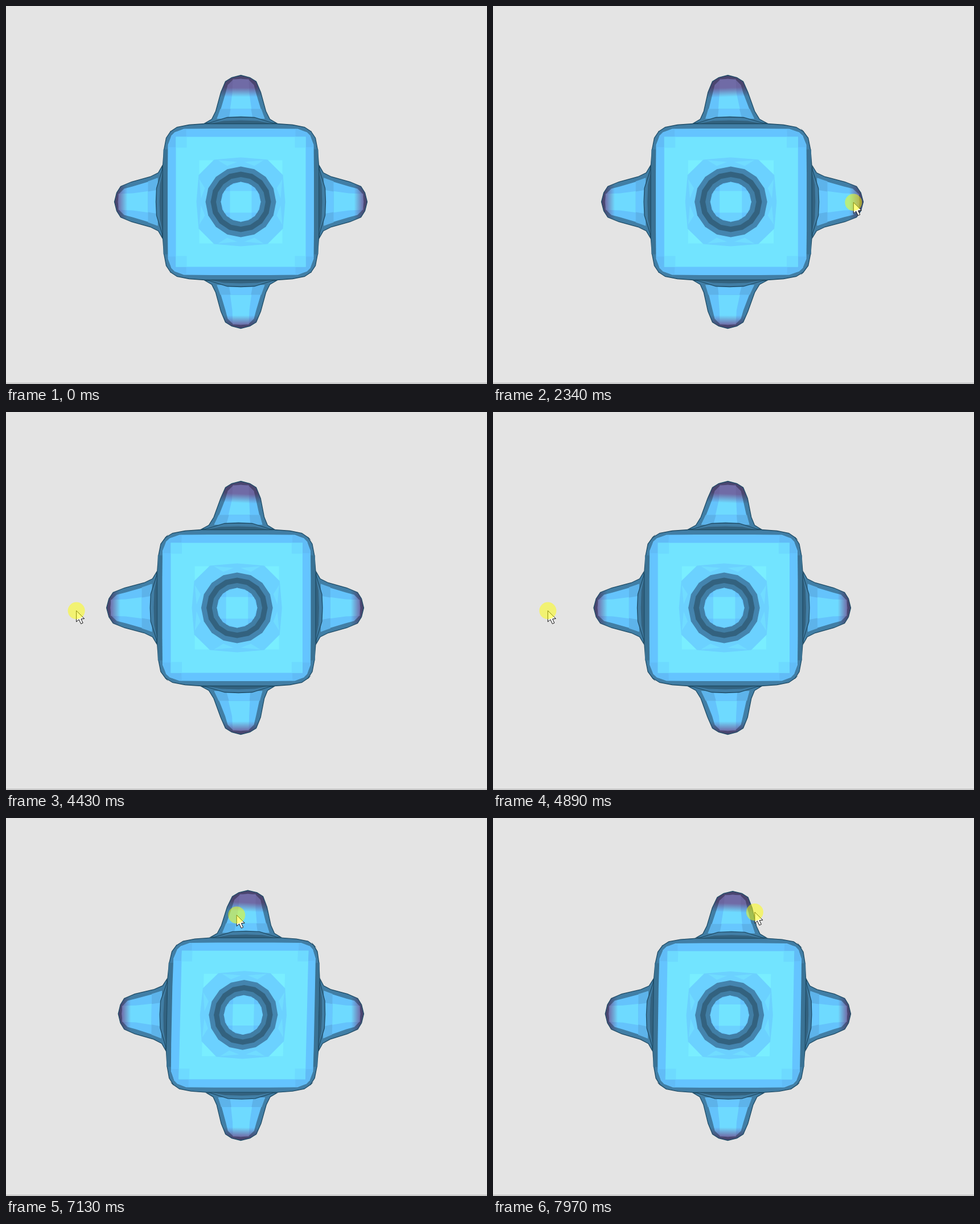
Write an HTML page with a canvas that moves like this. It is 845 px wide and 663 px high and loops after 8 s.

```html
<!DOCTYPE html>
<html>
<head>
<meta charset="utf-8">
<style>
html, body { margin: 0; width: 845px; height: 663px; overflow: hidden; background: #e4e4e4; }
canvas { display: block; }
</style>
</head>
<body>
<canvas id="stage" width="845" height="663"></canvas>
<script>
const ctx = document.getElementById('stage').getContext('2d');
const LOOP = 8000, CX = 412.5, CY = 343.5, ARM = 222;
const EDGE = '#1f4c66', DARK = '#417ea5', DEEP = '#33627f', MID = '#64c4ff', FACE = '#72e4ff';

const clamp = (v, lo = 0, hi = 1) => Math.max(lo, Math.min(hi, v));
const ease = u => (u = clamp(u), u * u * (3 - 2 * u));

// Pointer stops: [ms, x, y]
const stops = [
  [70, 727, 559], [520, 638, 256], [650, 632, 344], [800, 632, 344],
  [1900, 811, 344], [2190, 805, 344], [2340, 633, 344], [2650, 599, 348],
  [2960, 599, 348], [3350, 410, 328], [3730, 221, 348], [3800, 221, 348],
  [4200, 93, 348], [4600, 142, 348], [4890, 96, 348], [4950, 87, 348],
  [5270, 230, 352], [5500, 230, 352], [6040, 446, 136], [6270, 440, 137]
];
// Each drag pulls the arm pointing along (ax, ay)
const drags = [
  { start: 800, end: 2650, ax: 1, ay: 0 },
  { start: 3800, end: 5270, ax: -1, ay: 0 },
  { start: 6350, end: LOOP, ax: 0, ay: -1 }
];
const PULL = .17, LAG = 80;

// Monotone cubic through one column of the stops
function track(t, col) {
  const last = stops.length - 1;
  if (t <= stops[0][0]) return stops[0][col];
  if (t >= stops[last][0]) return stops[last][col];
  const i = stops.findIndex(s => s[0] > t) - 1;
  const slope = j => j < 0 || j >= last ? 0 :
    (stops[j + 1][col] - stops[j][col]) / (stops[j + 1][0] - stops[j][0]);
  const tangent = j => {
    const a = slope(j - 1), b = slope(j);
    return a * b <= 0 ? 0 : 2 * a * b / (a + b);
  };
  const h = stops[i + 1][0] - stops[i][0], u = (t - stops[i][0]) / h, v = 1 - u;
  return stops[i][col] * v * v * (1 + 2 * u) + stops[i + 1][col] * u * u * (3 - 2 * u) +
    h * u * v * (v * tangent(i) - u * tangent(i + 1));
}

// The last drag circles the top arm clockwise, slow at both ends
function pointerAt(t) {
  const x = track(t, 1), y = track(t, 2), blend = ease((t - 6350) / 150);
  const phase = Math.sin(clamp((t - 7130) / 840, -1, 1) * Math.PI / 2);
  const angle = (95 + 330 * phase) * Math.PI / 180;
  return [x + blend * (415 + 105 * Math.cos(angle) - x),
          y + blend * (112 + 58 * Math.sin(angle) - y)];
}

function tipOffset({ start, end, ax, ay }, t) {
  const strength = PULL * ease((t - start) / 200);
  const [x, y] = pointerAt(Math.min(t - LAG, end));
  return [strength * (x - CX - ax * ARM), strength * (y - CY - ay * ARM) * (ay ? 1 : 0)];
}

// How strongly a point follows a tip, along and across the arm's axis
function weight(along, across) {
  const u = clamp((along + ARM) / (2 * ARM));
  return (.6 * u + .4 * u ** 4) * ease((205 - Math.abs(across)) / 95);
}

let pulls = [];
function warp([x, y]) {
  let px = CX + x, py = CY + y;
  for (const { ax, ay, dx, dy } of pulls) {
    const w = weight(x * ax + y * ay, x * ay - y * ax);
    px += dx * w;
    py += dy * w;
  }
  return [px, py];
}

const QUARTERS = [0, 1, 2, 3];
const turn = ([x, y], q) => [[x, y], [-y, x], [-x, -y], [y, -x]][q];
const flip = points => points.map(([x, y]) => [-x, y]).reverse();
const mirror = half => [...half, ...flip(half)];
const fourfold = half => QUARTERS.flatMap(q => [...flip(half), ...half].map(p => turn(p, q)));
const square = r => fourfold([[r, -r]]);
const circle = r => Array.from({ length: 16 }, (_, i) =>
  [r * Math.sin(i * Math.PI / 8), -r * Math.cos(i * Math.PI / 8)]);

function poly(points, fill, q = 0, stroke) {
  ctx.beginPath();
  points.forEach(p => ctx.lineTo(...warp(turn(p, q))));
  ctx.closePath();
  ctx.fillStyle = fill;
  ctx.fill();
  if (stroke) {
    ctx.strokeStyle = stroke;
    ctx.lineWidth = 1.3;
    ctx.stroke();
  }
}
function fade(q, from, to, tipColor, baseColor) {
  const g = ctx.createLinearGradient(...warp(turn([0, from], q)), ...warp(turn([0, to], q)));
  g.addColorStop(0, tipColor);
  g.addColorStop(1, baseColor);
  return g;
}

const armOuter = mirror([[0, -222], [16, -218], [27, -211], [35, -192], [44, -159], [51, -145], [63, -138]]);
const armInner = mirror([[0, -216], [14, -214], [23, -205], [27, -190], [36, -160], [42, -146]]);
const armStrip = mirror([[14, -215], [15, -190], [21, -146]]);
const armBand = mirror([[36, -163], [42, -146]]);
const stripBand = mirror([[18, -163], [21, -146]]);
const collar = mirror([[0, -149], [24, -148], [63, -136]]);
const collarShade = mirror([[0, -143], [30, -142], [62, -136]]);

function arm(q) {
  const [from, to] = q === 0 ? [-200, -184] : [-216, -199];
  poly(armOuter, fade(q, from - 2, to, '#4a456f', DARK), q, EDGE);
  poly(armInner, fade(q, from, to, '#6b659f', '#64c3fc'), q);
  poly(armStrip, fade(q, from, to, '#706ba6', '#6edaff'), q);
  poly(armBand, '#5db3ea', q);
  poly(stripBand, '#67c7ff', q);
  poly(collar, DARK, q, EDGE);
  poly(collarShade, DEEP, q);
}

const bodyOuter = fourfold([[63, -137], [91, -135], [112, -131], [124, -123]]);
const bodyInner = fourfold([[50, -128.5], [100, -128], [116, -122]]);
const bandCorner = [[96, -128], [116, -122], [122, -116], [128, -96], [114, -96], [96, -114]];
const faceCorner = [[95, -114], [114, -114], [114, -95], [95, -95]];
const patch = fourfold([[0, -78], [47, -74]]);

function body() {
  poly(bodyOuter, DARK, 0, EDGE);
  for (const q of [1, 3]) poly(mirror([[92, -128], [92, -136]]), '#3a7294', q);
  poly(bodyInner, MID);
  for (const q of QUARTERS) poly(bandCorner, '#61bcf7', q);
  poly(square(114), FACE);
  for (const q of QUARTERS) poly(faceCorner, '#6ddaff', q);

  poly(square(73), '#79eeff');
  poly(patch, '#6bd1ff');
  for (const q of QUARTERS) {
    for (const side of [-1, 1]) {
      poly([[side * 6, -70], [side * 40, -73], [side * 24, -63]], '#70dcff', q);
    }
  }
  poly(circle(62), '#4484ae');
  poly(circle(53), DEEP);
  poly(circle(43.5), DARK);
  poly(circle(35), MID);
  for (const q of [0, 1]) poly([[-19, -29], [0, -35], [19, -29], [19, 29], [0, 35], [-19, 29]], '#6bd1ff', q);
  poly(square(19), FACE);
}

const arrow = [[0, 0], [0, 19.5], [4.5, 15.5], [8, 23], [11.5, 21.5], [8.2, 14.5], [14, 14]];
function pointer(t) {
  if (t < stops[0][0]) return;
  const [x, y] = pointerAt(t);
  ctx.beginPath();
  arrow.forEach(([ax, ay]) => ctx.lineTo(x + .5 + ax, y + .5 + ay));
  ctx.closePath();
  ctx.fillStyle = '#fff';
  ctx.fill();
  ctx.strokeStyle = '#111';
  ctx.lineWidth = 1;
  ctx.stroke();
  if (drags.some(d => t >= d.start && t <= d.end)) {
    ctx.beginPath();
    ctx.arc(x + .5, y + .5, 15, 0, 7);
    ctx.fillStyle = 'rgba(255,255,0,.5)';
    ctx.fill();
  }
}

function draw(now) {
  const t = now % LOOP;
  pulls = drags.map(d => {
    const [dx, dy] = tipOffset(d, t);
    return { ...d, dx, dy };
  });
  ctx.fillStyle = '#e4e4e4';
  ctx.fillRect(0, 0, 845, 663);
  ctx.fillStyle = '#aaa';
  ctx.fillRect(0, 661, 845, 1);
  QUARTERS.forEach(arm);
  body();
  pointer(t);
  requestAnimationFrame(draw);
}
requestAnimationFrame(draw);
</script>
</body>
</html>
```
